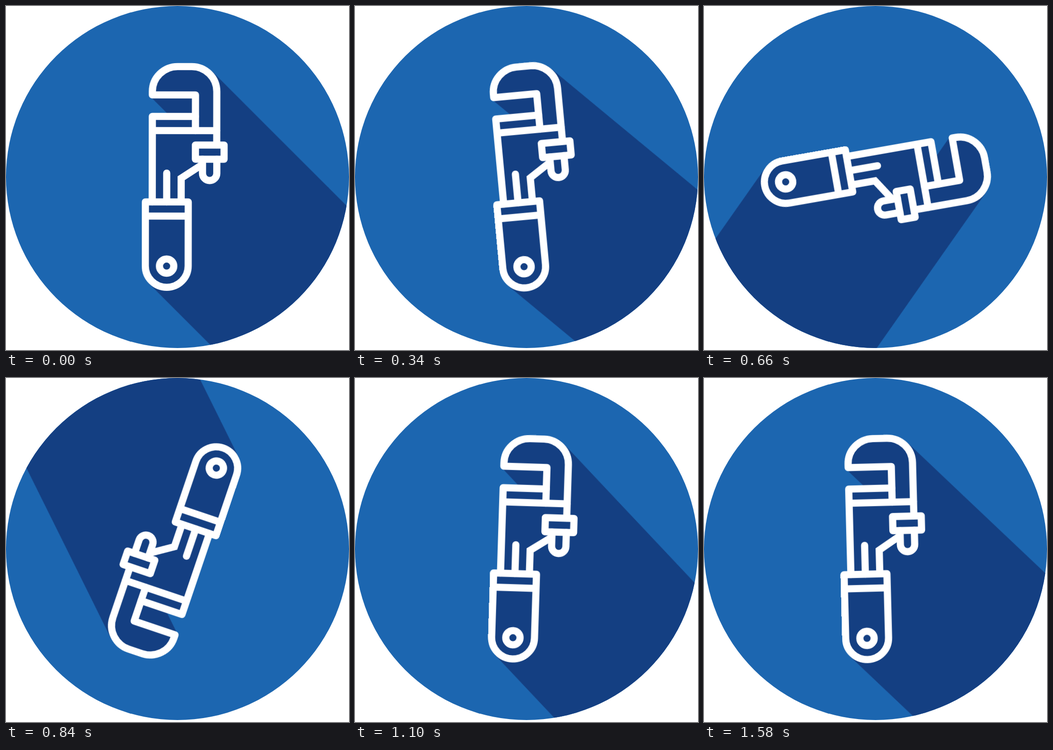
An HTML page that plays this animation: 700x704 px, repeating every 1600 ms.

```html
<!DOCTYPE html>
<html lang="en">
<head>
<meta charset="utf-8">
<title>Pipe wrench</title>
<style>
  html, body {
    margin: 0;
    width: 100%;
    height: 100%;
    overflow: hidden;
    background: #fff;
  }
  svg { display: block; }
  .icon {
    transform-origin: 350px 350px;
    animation: turn 1600ms linear infinite;
  }
  .lines {
    fill: none;
    stroke: #fff;
    stroke-width: 14.6;
    stroke-linecap: round;
    stroke-linejoin: round;
  }
  /* wobble, full turn, wobble */
  @keyframes turn {
    0%     { transform: rotate(0deg); }
    8.4%   { transform: rotate(10deg); }
    25.25% { transform: rotate(-10deg); }
    33.8%  { transform: rotate(0deg); }
    41.25% { transform: rotate(79.35deg); }
    52.5%  { transform: rotate(198deg); }
    60%    { transform: rotate(281deg); }
    67.3%  { transform: rotate(360deg); }
    75.7%  { transform: rotate(370deg); }
    91.9%  { transform: rotate(350deg); }
    100%   { transform: rotate(360deg); }
  }
</style>
</head>
<body>
<svg width="700" height="704" viewBox="0 0 700 704">
  <clipPath id="disc"><circle cx="350" cy="350" r="350"/></clipPath>
  <circle cx="350" cy="350" r="350" fill="#1c66b0"/>
  <g clip-path="url(#disc)">
    <g class="icon">
      <!-- body and long shadow -->
      <path fill="#143f82" d="M298.5 175A51.5 51 0 0 1 350 124H379L420.4 133.6L900 613V1176L292 568L284.5 532V401H298.5V226H335L298.5 189.5Z"/>
      <g class="lines">
        <!-- jaw -->
        <path d="M430 284V175A51 51 0 0 0 379 124H350A51.5 51 0 0 0 298.5 175V182H386.5V255"/>
        <!-- shaft -->
        <path d="M386.5 226H298.5V401M298.5 255H430M328 342V401"/>
        <path d="M401 324L357.5 352.5V401" stroke-linecap="butt" stroke-linejoin="miter"/>
        <!-- nut and screw -->
        <path d="M386.5 284.5H445V313.5H386.5Z"/>
        <path d="M401 313.5V342.5A14.6 14.6 0 0 0 430.2 342.5V313.5"/>
        <!-- handle -->
        <path d="M284.5 401H372V532A43.75 43.75 0 0 1 284.5 532ZM284.5 430H372"/>
        <circle cx="328" cy="532.3" r="14.6"/>
      </g>
    </g>
  </g>
</svg>
</body>
</html>
```
